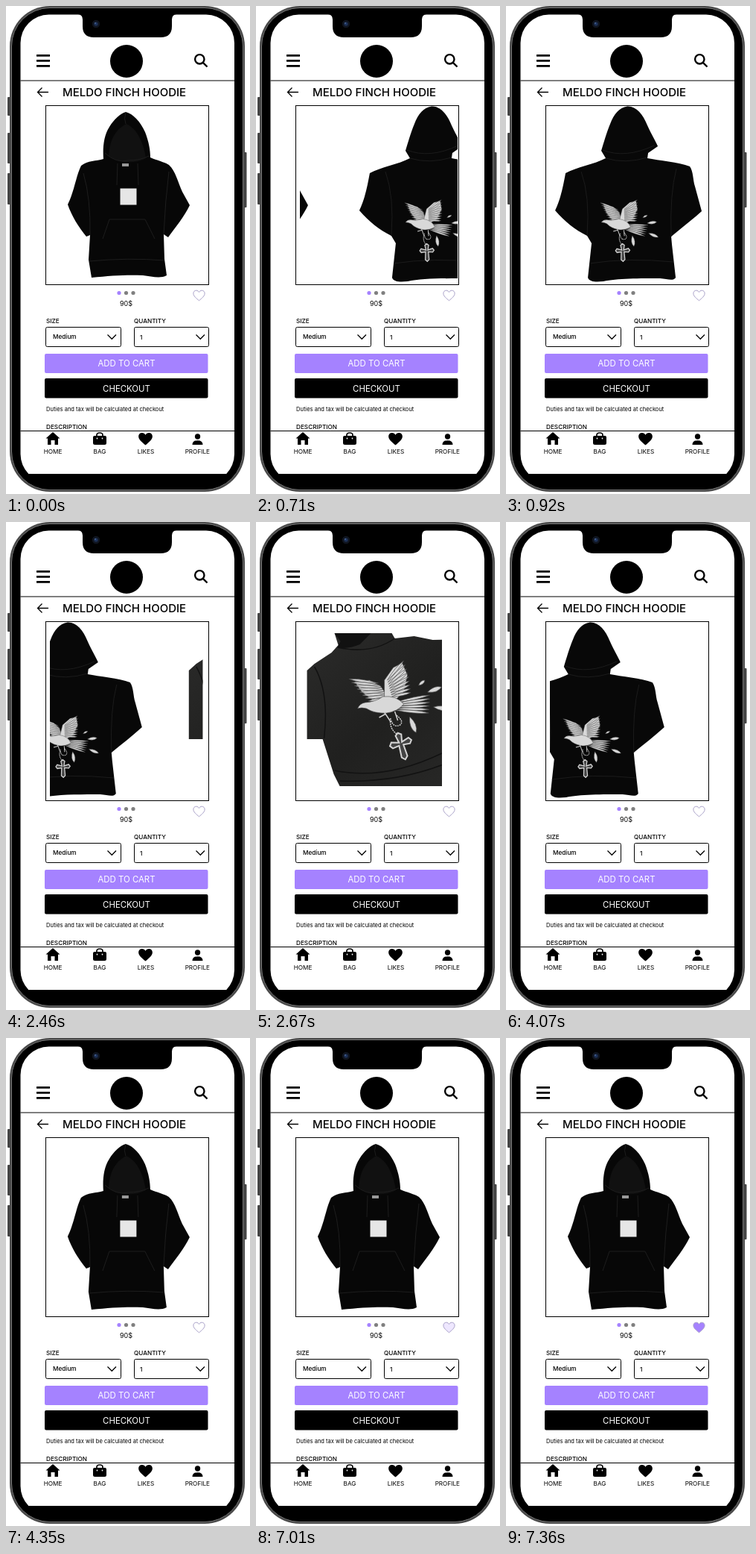
Recreate the animation shown at these times as an HTML page. Size 328 by 654 pixels, loop 8 s.

```html
<!DOCTYPE html>
<html lang="en">
<head>
<meta charset="utf-8">
<title>Hoodie shop</title>
<style>
html, body { margin: 0; width: 100%; height: 100%; overflow: hidden; background: #fff; }
svg { display: block; }
text { font-family: Inter, Roboto, "Liberation Sans", sans-serif; font-size: 8.2px; }
.mid { text-anchor: middle; }
.line { fill: none; stroke: #000; }
</style>
</head>
<body>
<svg width="328" height="654" viewBox="0 0 328 654">
  <defs>
    <linearGradient id="cloth" x1="0" y1="0" x2="1" y2="1">
      <stop offset="0" stop-color="#2b2b2a"/><stop offset=".5" stop-color="#20201f"/><stop offset="1" stop-color="#292928"/>
    </linearGradient>
    <path id="love" d="M0 7C-3.5 4-7.6 1-7.6-2.6C-7.6-5-5.8-6.6-3.8-6.6C-2.1-6.6-.7-5.6 0-4.2C.7-5.6 2.1-6.6 3.8-6.6C5.8-6.6 7.6-5 7.6-2.6C7.6 1 3.5 4 0 7Z"/>
    <clipPath id="view"><rect id="window" x="59" y="134" height="239"/></clipPath>
    <clipPath id="lit"><rect width="328" height="627"/></clipPath>
    <g id="print"></g>
  </defs>

  <!-- phone -->
  <g fill="#444">
    <rect x="2" y="122" width="5" height="25" rx="1"/>
    <rect x="2" y="170" width="5" height="41" rx="1"/>
    <rect x="2" y="224" width="5" height="42" rx="1"/>
    <rect x="319" y="196" width="4.5" height="74" rx="1"/>
  </g>
  <rect x="5" y="0" width="316" height="651" rx="54" fill="#4a4a4a"/>
  <rect x="7.500" y="2.500" width="311" height="646" rx="51.500" stroke="#747474"/>
  <rect x="19.500" y="11.500" width="287.500" height="627" rx="38" fill="#fff" clip-path="url(#lit)"/>
  <path d="M97 11H229Q223 12 223 18V27Q223 42 208 42H118Q103 42 103 27V18Q103 12 97 11Z"/>
  <circle cx="121" cy="24" r="5.2" fill="#10151f"/>
  <circle cx="121" cy="24" r="2.6" fill="#1d3158"/>
  <circle cx="120" cy="23" r="1" fill="#4a6694"/>

  <!-- header -->
  <path class="line" d="M41 66.300H59M41 73.300H59M41 80.300H59" stroke-width="2.800"/>
  <circle cx="162" cy="74" r="22"/>
  <g class="line" stroke-width="2.4">
    <circle cx="260.3" cy="71.3" r="6.2"/><path d="M264.8 75.8L270.5 81.5"/>
  </g>
  <path class="line" d="M19.5 100H307"/>
  <path class="line" d="M57 115.5H42.5M48.5 109.5L42.5 115.5L48.5 121.5" stroke-width="1.3"/>
  <text x="76" y="120.6" style="font-size:15px;font-weight:500">MELDO FINCH HOODIE</text>

  <!-- carousel -->
  <g clip-path="url(#view)">
    <g id="front">
      <path fill="#070707" d="M131 205C130 191 131 174 139 162C145 152 154 144 161 142C170 144 181 155 187 169C192 182 194 193 194 203C203 207 213 209 219 213C228 221 231 236 237 249L247 267C240 282 228 296 218 310L212 306L213 339L216 361C207 366 195 362 184 361C165 360 142 361 115 364L111 340L113 307L108 309C98 297 88 281 83 266C92 248 94 228 101 214C110 207 121 208 131 205Z"/>
      <path fill="#111" d="M138 201C139 183 145 166 162 158C177 165 185 184 188 204C174 212 150 211 138 201Z"/>
      <path fill="none" stroke="#1d1d1d" d="M133 197Q148 211 164 207Q180 207 192 201M161 143Q158 151 161 158M104 224Q114 258 113 307M219 222Q214 262 212 306M130 312L139 286H187L200 312M112 342Q164 337 213 341M150 211L149 240M177 211L178 240"/>
      <rect x="156" y="211" width="9" height="4" fill="#999"/>
      <rect x="153.500" y="244.500" width="22" height="22" fill="#e6e6e6"/>
    </g>
    <g id="back">
      <path fill="#080808" d="M128 194C131 184 135 170 140 158C145 145 152 136 163 134.500C175 134 184 145 190 160C196 173 201 181 204 188L191 197L190 204C205 207 232 209 247 215C252 222 251 233 254 242L263 275C250 287 235 298 222 309L223 320L228 364C225 369 217 366 207 365C181 365 148 365 131 369C121 370 112 370 110 364L115 318L109 308C93 300 79 289 66 274C74 257 77 240 80 224C94 216 119 212 134 204Z"/>
      <path fill="none" stroke="#1b1b1b" d="M134 204Q160 212 190 203M130 193Q160 205 199 187M101 222Q113 255 109 307M229 218Q220 252 222 309M112 345Q165 337 225 343"/>
      <use href="#print" transform="translate(128 290) rotate(14) scale(.64)"/>
    </g>
    <g id="close">
      <path fill="url(#cloth)" d="M56 199L66 190L89 175L98 165L93 149H170L174 156L200 153L225 158L290 157V354H100L92 338L77 291H56Z"/>
      <path fill="#111" d="M93 149H142L127 164Q110 171 97 168L101 160Z"/>
      <path fill="none" stroke="#121212" stroke-width="1.5" d="M97 168Q142 178 174 156M66 194Q86 228 79 290M93 333Q165 348 249 304M100 347Q180 350 249 321"/>
      <use href="#print" transform="translate(124 250)"/>
    </g>
  </g>
  <rect class="line" x="53.5" y="133.5" width="219" height="240"/>

  <!-- product details -->
  <circle cx="152" cy="384.500" r="2.600" fill="#a582ff"/>
  <circle cx="161.500" cy="384.500" r="2.600" fill="#808080"/>
  <circle cx="171" cy="384.500" r="2.600" fill="#808080"/>
  <use id="like" href="#love" x="259.500" y="387.800" stroke="#a8a0c8"/>
  <text class="mid" x="161.500" y="402" style="font-size:9px">90$</text>
  <text x="54" y="425" font-weight="500">SIZE</text>
  <text x="172" y="425" font-weight="500">QUANTITY</text>
  <g class="line">
    <rect x="53.500" y="430.500" width="101" height="26" rx="2"/>
    <rect x="172.500" y="430.500" width="100" height="26" rx="2"/>
    <path d="M136.500 440.500L142.300 446.300L148 440.500M255.500 440.500L261.300 446.300L267 440.500" stroke-width="1.300"/>
  </g>
  <text x="63" y="446.300" font-weight="500">Medium</text>
  <text x="180" y="446.600" font-weight="500">1</text>
  <rect x="52" y="466" width="219.500" height="26" rx="2" fill="#a582ff"/>
  <rect x="52" y="499" width="219.500" height="26.500" rx="2"/>
  <g class="mid" fill="#fff">
    <text x="162" y="483" style="font-size:11.4px">ADD TO CART</text>
    <text x="162" y="516.500" style="font-size:11.4px">CHECKOUT</text>
  </g>
  <text x="54" y="543" style="font-size:7.54px">Duties and tax will be calculated at checkout</text>
  <text x="54" y="567" font-weight="500">DESCRIPTION</text>

  <!-- tab bar -->
  <path class="line" d="M19.500 569.500H307"/>
  <path d="M63 571L72.500 579.500H70V588H65.500V582H60.500V588H56V579.500H53.500Z"/>
  <path d="M119 576H133Q135 576 135 578V585.500Q135 588 132.500 588H119.500Q117 588 117 585.500V578Q117 576 119 576Z"/>
  <path class="line" d="M122 579V575Q122 572 126 572Q130 572 130 575V579" stroke-width="1.700"/>
  <g fill="#fff"><circle cx="122.500" cy="579.500" r=".9"/><circle cx="129.500" cy="579.500" r=".9"/></g>
  <use href="#love" transform="translate(187.500 580) scale(1.23)"/>
  <circle cx="257.500" cy="577" r="3.700"/>
  <path d="M250.500 588Q250.500 582.300 257.500 582.300Q264.500 582.300 264.500 588Z"/>
  <g class="mid">
    <text x="63" y="600">HOME</text>
    <text x="126" y="600">BAG</text>
    <text x="188" y="600">LIKES</text>
    <text x="257.300" y="600">PROFILE</text>
  </g>
</svg>
<script>
const $ = id => document.getElementById(id);

// Leaf-shaped feather from (x, y), pointing along angle a in degrees
function feather(x, y, a, len, w) {
  return `<path transform="translate(${x} ${y}) rotate(${a})" d="M0 0Q${len * .6} ${-w} ${len} 0Q${len * .6} ${w} 0 0Z"/>`;
}

// Row of feathers: root, angle and length all run from first to last
function wing(n, from, to) {
  let out = "";
  for (let i = 0; i < n; i++) {
    const [x, y, a, len] = from.map((v, k) => v + (to[k] - v) * i / (n - 1));
    out += feather(x, y, a, len, 3.4);
  }
  return out;
}

// Bird, loose feathers and cross, with the beak at the origin
$("print").innerHTML = `<g fill="#d8d8d8" stroke="#444" stroke-width=".6">
  <path d="M-4-36L16-38L31-30L43-12L24-9L6-22Z"/>
  ${wing(8, [28, -34, 188, 40], [42, -14, 172, 28])}
  <path d="M36-14V-38L48-55L60-61L67-45L62-22L50-11Z"/>
  ${wing(9, [40, -38, -50, 34], [46, -16, -12, 26])}
  ${wing(6, [50, -8, -12, 48], [50, 2, 5, 46])}
  <path d="M0 0Q3-7 10-8Q24-9 34-16Q52-18 62-6Q54 4 39 6Q23 7 12 0Q5-2 0 0Z"/>
  ${feather(94, -22, -20, 20, 6)}${feather(102, -2, 8, 22, 6)}
  ${feather(70, 11, 68, 23, 7)}${feather(82, -31, -40, 11, 4)}
  </g>
  <g fill="none" stroke="#cfcfcf" stroke-width="1.500">
    <path d="M36 5L44 17M50 4L54 16M29 12L38 7"/>
    <path d="M44 13Q48 27 57 22Q63 17 52 9M44 17Q44 29 54 35" stroke-dasharray="2 1"/>
  </g>
  <g transform="translate(59 50) rotate(-16)">
    <path fill="#444" stroke="#d4d4d4" stroke-width="2" d="M-2-5L-4-15L0-18L4-15L2-5L12-8L15-4L12 0L3-1L4 15L0 19L-4 15L-3-1L-12 0L-15-4L-12-8Z"/>
  </g>`;

const LOOP = 8000, STEP = 70, FIRST = 500;
const SLIDE2 = 250, SLIDE3 = 520;

function ease(t, start) {
  const x = Math.min(1, Math.max(0, (t - start) / 365));
  return 1 - (1 - x) ** 2.5;
}

function draw(time) {
  const t = FIRST + Math.floor((time - FIRST) / STEP) * STEP;
  const scroll = SLIDE2 * ease(t, 568)
    + (SLIDE3 - SLIDE2) * ease(t, 2412)
    - SLIDE3 * ease(t, 3998);
  const place = (id, x) => $(id).setAttribute("transform", `translate(${x - scroll} 0)`);
  place("front", 0);
  place("back", SLIDE2);
  place("close", SLIDE3);

  // The window narrows toward the last slide
  const narrow = Math.max(0, (scroll - SLIDE2) / (SLIDE3 - SLIDE2));
  $("window").setAttribute("width", 212 - 22 * narrow);

  const liked = ease(t, 6980);
  $("like").setAttribute("fill", `rgba(165,130,255,${liked})`);
}

const begin = performance.now();
function tick() {
  draw((performance.now() - begin) % LOOP);
  requestAnimationFrame(tick);
}
tick();
</script>
</body>
</html>
```
